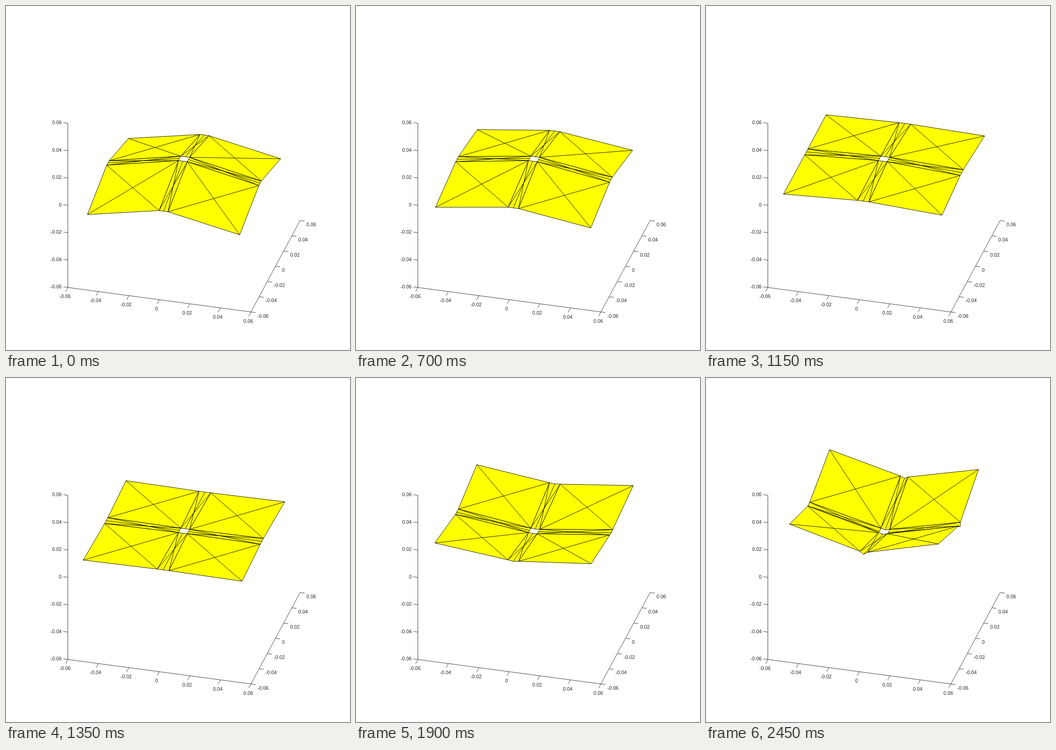
Write an HTML page with a canvas that moves like this. It is 748x748 px and loops after 2.5 s.

```html
<!DOCTYPE html>
<html lang="en">
<head>
<meta charset="utf-8">
<style>
html, body { margin: 0; width: 100%; height: 100%; overflow: hidden; background: #fff; }
canvas { display: block; width: 748px; height: 748px; }
</style>
</head>
<body>
<canvas id="stage" width="748" height="748"></canvas>
<script>
const ctx = document.getElementById('stage').getContext('2d');
const INK = '#262626';

// Oblique projection: x and y in hundredths, lift in pixels
const project = (x, y, lift = 0) => [
  387.1 + 33.17 * x + 8.92 * y,
  332.6 + 4.42 * x - 16.58 * y - lift
];

function trace(points, closed) {
  ctx.beginPath();
  points.forEach(p => ctx.lineTo(...p));
  if (closed) {
    ctx.closePath();
    ctx.fill();
  }
  ctx.stroke();
}

function label(text, x, y, align) {
  ctx.textAlign = align;
  ctx.fillText(text, x, Math.round(y + 3.4));
}

function drawAxes() {
  ctx.strokeStyle = ctx.fillStyle = INK;
  ctx.lineWidth = 0.9;
  ctx.font = '10.67px "Liberation Sans", Arial, sans-serif';
  trace([[134.5, 255], [134.5, 612], [532.5, 665.3], [639.5, 466.5]]);
  for (let i = 0; i < 7; i++) {
    const value = (i - 3) * 0.02;
    const text = value ? value.toFixed(2) : '0';
    const x = 134.5 + 66.33 * i, xy = 612 + 8.88 * i;
    trace([[x, xy], [x - 4.7, xy + 9]]);
    label(text, 128.3 + 66.4 * i, 632 + 8.9 * i, 'center');

    const y = 532.5 + 17.83 * i, yy = 665.3 - 33.13 * i;
    trace([[y, yy], [y + 10, yy + 1.3]]);
    label(text, 546.5 + 17.8 * i, 674.2 - 33.15 * i, 'left');

    const z = 612 - 59.5 * i;
    trace([[134.5, z], [124.8, z - 1.3]]);
    label(text, 121, z - 1.2, 'right');
  }
}

function drawSheet(step) {
  const u = step - 18;
  const half = 5.207 - 0.00067 * u * u;
  const reach = 5.1 - 0.00034 * u * u;
  const strip = 0.385 - 0.00028 * u * u;
  const cornerLift = 3.28 * u + 0.0002 * u ** 3;
  const edgeLift = cornerLift * (0.55 - 0.00012 * u * u);
  const sag = (Math.max(u, 0) / 22) ** 2;
  const hole = 0.29;

  ctx.strokeStyle = '#000';
  ctx.fillStyle = '#ff0';
  ctx.lineWidth = 0.9;

  const panel = (sx, sy) => {
    const inner = project(sx * hole, sy * hole);
    const edgeY = project(sx * strip, sy * reach, edgeLift);
    const corner = project(sx * half, sy * half, cornerLift);
    const edgeX = project(sx * reach, sy * strip, edgeLift);
    trace([inner, edgeY, corner, edgeX], true);
    trace([inner, corner]);
    trace([edgeY, edgeX]);
  };

  // Hinge strip running outward along (dx, dy)
  const hinge = (dx, dy) => {
    const at = (out, side, lift) =>
      project(dx * out - dy * side, dy * out + dx * side, lift);
    const a = at(hole, hole), b = at(hole, 0, -2.3 * sag), c = at(hole, -hole);
    const d = at(reach, -strip, edgeLift);
    const e = at(reach + 0.06 * sag, 0, edgeLift - 4.8 * sag);
    const f = at(reach, strip, edgeLift);
    trace([a, b, c, d, e, f], true);
    trace([a, d]);
    trace([b, e]);
    trace([c, f]);
  };

  hinge(0, 1);
  panel(-1, 1);
  panel(1, 1);
  hinge(-1, 0);
  hinge(1, 0);
  hinge(0, -1);
  panel(-1, -1);
  panel(1, -1);
}

function frame(now) {
  const t = now % 2500;
  ctx.fillStyle = '#fff';
  ctx.fillRect(0, 0, 748, 748);
  drawAxes();
  drawSheet(t < 500 ? 0 : Math.floor((t - 500) / 50) + 1);
  requestAnimationFrame(frame);
}
requestAnimationFrame(frame);
</script>
</body>
</html>
```
